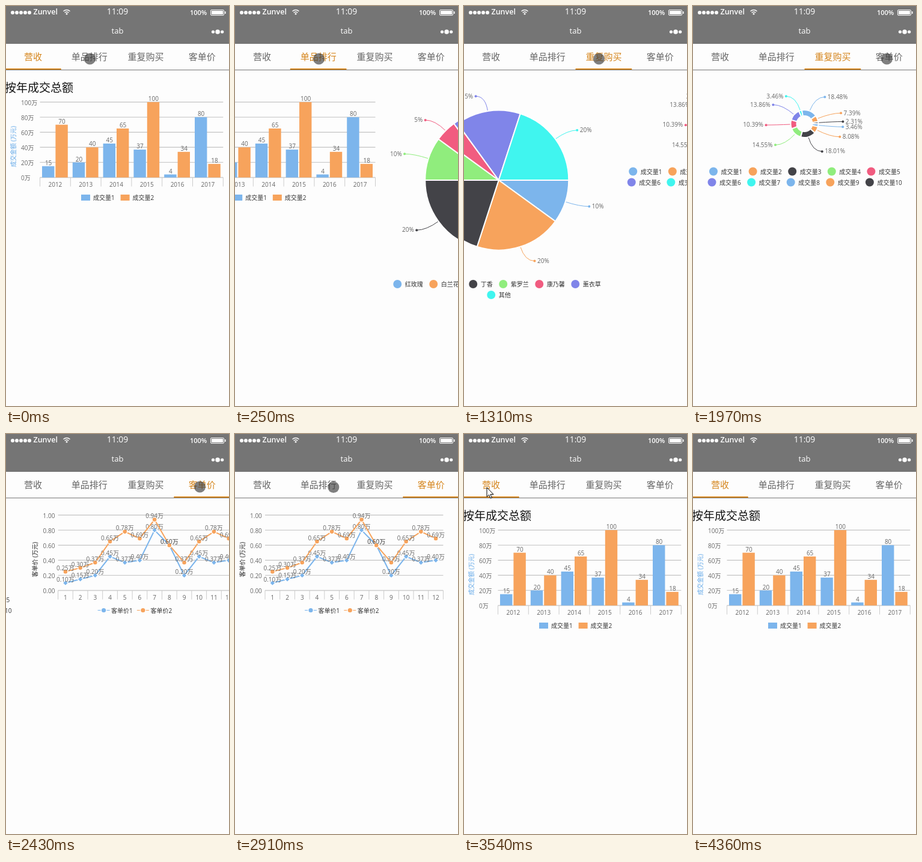
These frames come from a looping animation (371 px wide and 666 px high, 4610 ms). An HTML page:

```html
<!DOCTYPE html>
<html lang="zh">
<head>
<meta charset="utf-8">
<style>
  html, body { margin: 0; width: 100%; height: 100%; overflow: hidden; background: #fdfdfd; }
  svg { display: block; width: 371px; height: 666px; }
  text { font-family: "Open Sans", "Noto Sans", "Noto Sans CJK SC", "Noto Sans CJK", sans-serif; white-space: pre; }
</style>
</head>
<body>
<svg id="stage" viewBox="0 0 371 666"></svg>
<script>
const LOOP = 4610, PITCH = 375, TAB = PITCH / 4, GLIDE = 500;
const BLUE = '#7cb5ec', ORANGE = '#f7a35c', ACTIVE = '#d5851c', PAPER = '#fdfdfd';
const COLORS = [BLUE, ORANGE, '#434348', '#90ed7d', '#f15c80', '#8085e9', '#40f5ef'];
const color = i => COLORS[i % COLORS.length];

const list = (n, fn) => Array.from({ length: n }, (_, i) => fn(i));
const draw = (n, fn) => list(n, fn).join('');

// Markup helpers; text is placed by its vertical centre.
const text = (x, y, str, { size = 10, fill = '#666', anchor = 'start', extra = '' } = {}) =>
  `<text x="${x}" y="${y + size * .36}" font-size="${size}" fill="${fill}" text-anchor="${anchor}" ${extra}>${str}</text>`;
const middle = (x, y, str, opts) => text(x, y, str, { anchor: 'middle', ...opts });
const rect = (x, y, w, h, fill, extra = '') =>
  `<rect x="${x}" y="${y}" width="${w}" height="${h}" fill="${fill}" ${extra}/>`;
const circle = (x, y, r, fill, extra = '') =>
  `<circle cx="${x}" cy="${y}" r="${r}" fill="${fill}" ${extra}/>`;
const path = (d, stroke, width = 1, fill = 'none') =>
  `<path d="${d}" stroke="${stroke}" stroke-width="${width}" fill="${fill}"/>`;

// Five horizontal bands with row labels, and ticks between the columns.
function axes(left, step, top, rowLabel, columns, title, titleFill) {
  const right = left + step * columns.length, bottom = top + 125.5;
  return draw(6, i => {
    const y = top + i * 25.1;
    return path(`M${left} ${y}H${right}`, '#ccc', 1.4) + text(25, y + 1.2, rowLabel(1 - i / 5));
  })
    + draw(columns.length + 1, i => path(`M${left + i * step} ${bottom}v15`, '#ccc'))
    + columns.map((c, i) => middle(left + (i + .5) * step, bottom + 11.5, c)).join('')
    + middle(0, 0, title, { fill: titleFill, extra: `transform="translate(12 ${top + 74}) rotate(-90)"` });
}

function barPage() {
  const left = 56.5, step = 50.8, base = 285.5;
  const series = [[15, 20, 45, 37, 4, 80], [70, 40, 65, 100, 34, 18]];
  const bars = series.map((values, s) => values.map((v, i) => {
    const x = left + 3.5 + i * step + s * 22.4, h = v * 1.255;
    return rect(x, base - h, 20.4, h, color(s)) + middle(x + 10.6, base - h - 5.5, v);
  }).join('')).join('');
  const legend = draw(2, i => rect(125 + i * 65.6, 314, 15, 10, color(i))
    + text(145 + i * 65.6, 319.5, '成交量' + (i + 1), { fill: '#333' }));
  return text(-2, 136.5, '按年成交总额', { size: 19, fill: '#111' })
    + axes(left, step, 160, v => Math.round(v * 100) + '万', list(6, i => 2012 + i), '成交金额 (万元)', '#62a8e8')
    + bars + legend;
}

function pie(cy, r, values) {
  const cx = 185.5;
  const at = (share, radius) => {
    const a = share / 50 * Math.PI;
    return [cx + radius * Math.cos(a), cy + radius * Math.sin(a)];
  };
  let start = 0, slices = '', labels = '';
  values.forEach((v, i) => {
    const mid = start + v / 2, edge = at(mid, r), bend = at(mid, r + 25);
    const side = bend[0] < cx ? -1 : 1, endX = bend[0] + side * 16;
    slices += path(`M${cx} ${cy}L${at(start, r)}A${r} ${r} 0 0 1 ${at(start + v, r)}Z`, '#fff', 2, color(i));
    labels += path(`M${edge}Q${bend} ${endX} ${bend[1]}`, color(i))
      + circle(endX, bend[1], 2, color(i))
      + text(endX + side * 4.5, bend[1] - .3, v + '%', { anchor: side < 0 ? 'end' : 'start' });
    start += v;
  });
  return labels + slices;
}

function dotLegend(x, y, names, first = 0) {
  return names.map((name, i) => {
    const out = circle(x, y, 7, color(first + i)) + text(x + 12.5, y + .5, name, { fill: '#333' });
    x += 30 + [...name].reduce((w, c) => w + (c < 'a' ? 5.6 : 10), 0);
    return out;
  }).join('');
}

function piePage() {
  return pie(290, 116.5, [10, 20, 20, 10, 5, 15, 20])
    + dotLegend(23, 463, ['红玫瑰', '白兰花', '丁香', '紫罗兰', '康乃馨', '薰衣草'])
    + dotLegend(173, 481, ['其他'], 6);
}

function ringPage() {
  const names = list(10, i => '成交量' + (i + 1));
  return pie(196, 23, [3.46, 8.08, 18.01, 14.55, 10.39, 13.86, 3.46, 18.48, 7.39, 2.31])
    + circle(185.5, 196, 14, PAPER)
    + dotLegend(34, 275.5, names.slice(0, 5))
    + dotLegend(31.5, 293.5, names.slice(5), 5);
}

function linePage() {
  const left = 50, step = 24.7;
  // The last four months repeat the third to the sixth.
  const series = [[.10, .15, .20, .45, .37, .40, .80, .60], [.25, .30, .37, .65, .78, .69, .94, .60]]
    .map(values => [...values, ...values.slice(2, 6)]);
  const lines = series.map((values, s) => {
    const points = values.map((v, i) => [left + (i + .5) * step, 260.5 - v * 125.5]);
    return path('M' + points.join('L'), color(s), 2)
      + points.map(([x, y]) => s
        ? circle(x, y, 4, ORANGE, 'stroke="#fff" stroke-width="1.4"')
        : path(`M${x - 4.7} ${y}l4.7 -4.7 4.7 4.7 -4.7 4.7z`, '#fff', 1.4, BLUE)).join('')
      + points.map(([x, y], i) => middle(x, y - 5.8, values[i].toFixed(2) + '万')).join('');
  }).join('');
  const legend = draw(2, i => {
    const x = 126 + i * 65.3;
    return path(`M${x - 10} 293.5h5m10 0h5`, color(i)) + circle(x, 293.5, 3.6, color(i))
      + text(x + 12.5, 294, '客单价' + (i + 1), { fill: '#333' });
  });
  return axes(left, step, 135, v => v.toFixed(2), list(12, i => i + 1), '客单价 (万元)', '#222')
    + lines + legend;
}

function header() {
  const white = { fill: '#fff' }, bold = { ...white, extra: 'font-weight="600"' };
  return rect(0, 0, 371, 63, '#757575')
    + draw(5, i => circle(11 + i * 7, 11, 3, '#fff'))
    + text(45.5, 9.8, 'Zunvel', { ...bold, size: 12.5 })
    + path('M95.5 8.8q5.5 -4.6 11 0M97.6 11.2q3.4 -2.8 6.8 0', '#fff', 1.4)
    + circle(101, 13.2, 1.4, '#fff')
    + middle(185.5, 9, '11:09', { ...white, size: 14 })
    + text(306, 11, '100%', { ...bold, size: 11 })
    + rect(340.5, 6.5, 22, 9, 'none', 'stroke="#fff" rx="1.5"')
    + rect(342, 8, 19, 6, '#fff') + rect(364, 9, 1.6, 4, '#fff')
    + middle(185.5, 41.5, 'tab', { ...white, size: 13 })
    + draw(3, i => circle(344.5 + i * 7.6, 43, i === 1 ? 3.8 : 2.6, '#fff'))
    + rect(0, 106, 371, 1, '#777');
}

const stage = document.getElementById('stage');
stage.innerHTML = rect(0, 0, 371, 666, PAPER)
  + `<g id="pages">${[barPage, piePage, ringPage, linePage].map((page, i) =>
    `<g transform="translate(${i * PITCH})">${page()}</g>`).join('')}</g>`
  + header()
  + ['营收', '单品排行', '重复购买', '客单价'].map((name, i) =>
    middle(45 + i * TAB, 84.8, name, { size: 15, extra: 'class="tab"' })).join('')
  + rect(-2, 104, TAB, 2, ACTIVE, 'id="underline"')
  + circle(0, 0, 9.5, '#3c3c3c', 'id="touch" fill-opacity=".65"')
  + '<path id="arrow" d="M0 0V15.5L3.6 12.2 6 18 8.4 17 6 11.5H11Z" fill="#fff" stroke="#000"/>';

const [pagesEl, underline, touch, arrow] =
  ['pages', 'underline', 'touch', 'arrow'].map(id => document.getElementById(id));
const tabs = [...document.querySelectorAll('.tab')];

// Each glide is [start time, new value].
const pageGlides = [[30, 1], [1090, 2], [2075, 3], [3080, 0]];
const xGlides = [[500, 224.5], [1460, 322.5], [2650, 38], [3760, 320.5]];
const yGlides = [[2650, 89], [3760, 638.5]];

const ease = p => p < .5 ? 4 * p ** 3 : 1 - 4 * (1 - p) ** 3;

function glide(from, glides, t) {
  return glides.reduce((value, [start, to]) => {
    const p = (t - start) / GLIDE;
    return p < 0 ? value : value + (to - value) * (p >= .9 ? 1 : ease(p));
  }, from);
}

// The screen refreshes in bursts, [first, second, last], every 120 ms, and rests between them.
const bursts = [[250, 370, 1030], [1310, 1460, 1970], [2280, 2430, 3540], [3940, 4090, 4360]];

function lastRefresh(time) {
  const burst = bursts.findLast(([first]) => first <= time);
  if (!burst) return 0;
  const [first, second, last] = burst;
  if (time < second) return first;
  return time >= last ? last : time - (time - second) % 120;
}

function render(now) {
  const t = lastRefresh(now % LOOP);
  const active = pageGlides.reduce((tab, [start, to]) => t >= start ? to : tab, 0);
  pagesEl.setAttribute('transform', `translate(${-PITCH * glide(0, pageGlides, t)})`);
  underline.setAttribute('x', active * TAB - 2);
  tabs.forEach((tab, i) => tab.setAttribute('fill', i === active ? ACTIVE : '#666'));

  const isArrow = t >= 3150 && t < 3940;
  const pointer = `translate(${glide(139.5, xGlides, t)} ${glide(88, yGlides, t)})`;
  for (const el of [touch, arrow]) {
    const shown = t < 4360 && (el === arrow) === isArrow;
    el.setAttribute('transform', pointer);
    el.setAttribute('visibility', shown ? 'visible' : 'hidden');
  }
}

const begin = performance.now();
(function loop() {
  render(performance.now() - begin);
  requestAnimationFrame(loop);
})();
</script>
</body>
</html>
```
